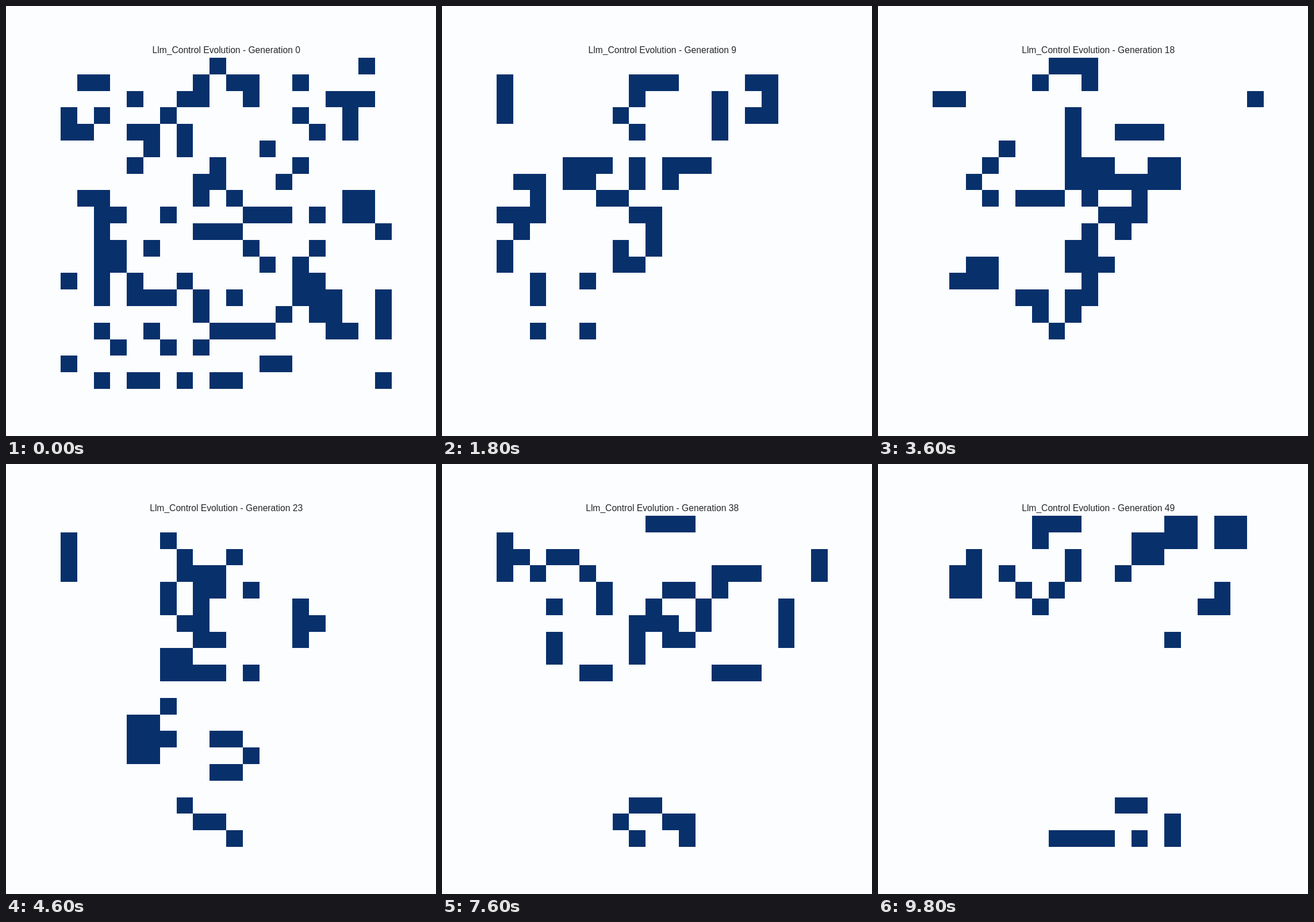
Animation of 748x748 px, one loop 10 s. Source, as an HTML page with a canvas:

```html
<!DOCTYPE html>
<html lang="en">
<head>
<meta charset="utf-8">
<title>Evolution</title>
<style>
  html, body { margin: 0; width: 100%; height: 100%; overflow: hidden; background: #fbfdff; }
  canvas { display: block; }
</style>
</head>
<body>
<canvas id="stage" width="748" height="748"></canvas>
<script>
const SIZE = 20, CELL = 28.8, LEFT = 95, TOP = 90;
const STEP = 200, COUNT = 50;

const seed = [
  '.........#........#.',
  '.##.....#.##..#.....',
  '....#..##..#....###.',
  '#.#...#.......#..#..',
  '##..##.#.......#.#..',
  '.....#.#....#.......',
  '....#....#....#.....',
  '........##...#......',
  '.##.....#.#......##.',
  '..##..#....###.#.##.',
  '..#.....###........#',
  '..##.#.....#...#....',
  '..##........#.#.....',
  '#.#.#..#......##....',
  '..#.###.#.#...###..#',
  '........#....#.##..#',
  '..#..#...####...##.#',
  '...#..#.#...........',
  '#...........##......',
  '..#.##.#.##........#'
].map(row => [...row].map(c => c === '#' ? 1 : 0));

const wrap = i => (i + SIZE) % SIZE;

function neighbours(grid, r, c) {
  let sum = -grid[r][c];
  for (let dr = -1; dr <= 1; dr++)
    for (let dc = -1; dc <= 1; dc++)
      sum += grid[wrap(r + dr)][wrap(c + dc)];
  return sum;
}

// Conway's Life on a torus
function evolve(grid) {
  return grid.map((row, r) => row.map((alive, c) => {
    const n = neighbours(grid, r, c);
    return n === 3 || (alive && n === 2) ? 1 : 0;
  }));
}

const generations = [seed];
while (generations.length < COUNT) generations.push(evolve(generations.at(-1)));

const ctx = document.getElementById('stage').getContext('2d');
const edgeX = c => Math.round(LEFT + c * CELL);
const edgeY = r => Math.round(TOP + r * CELL);

function draw(gen) {
  ctx.fillStyle = '#fbfdff';
  ctx.fillRect(0, 0, 748, 748);

  ctx.fillStyle = '#08306b';
  generations[gen].forEach((row, r) => row.forEach((alive, c) => {
    if (alive) ctx.fillRect(edgeX(c), edgeY(r), edgeX(c + 1) - edgeX(c), edgeY(r + 1) - edgeY(r));
  }));

  ctx.fillStyle = '#262626';
  ctx.font = '15.65px "Liberation Sans", Arial, sans-serif';
  ctx.textAlign = 'center';
  ctx.fillText('Llm_Control Evolution - Generation ' + gen, 383.2, 82);
}

const start = performance.now();
let shown = -1;

function tick() {
  const gen = Math.floor((performance.now() - start) / STEP) % COUNT;
  if (gen !== shown) draw(shown = gen);
  requestAnimationFrame(tick);
}
tick();
</script>
</body>
</html>
```
